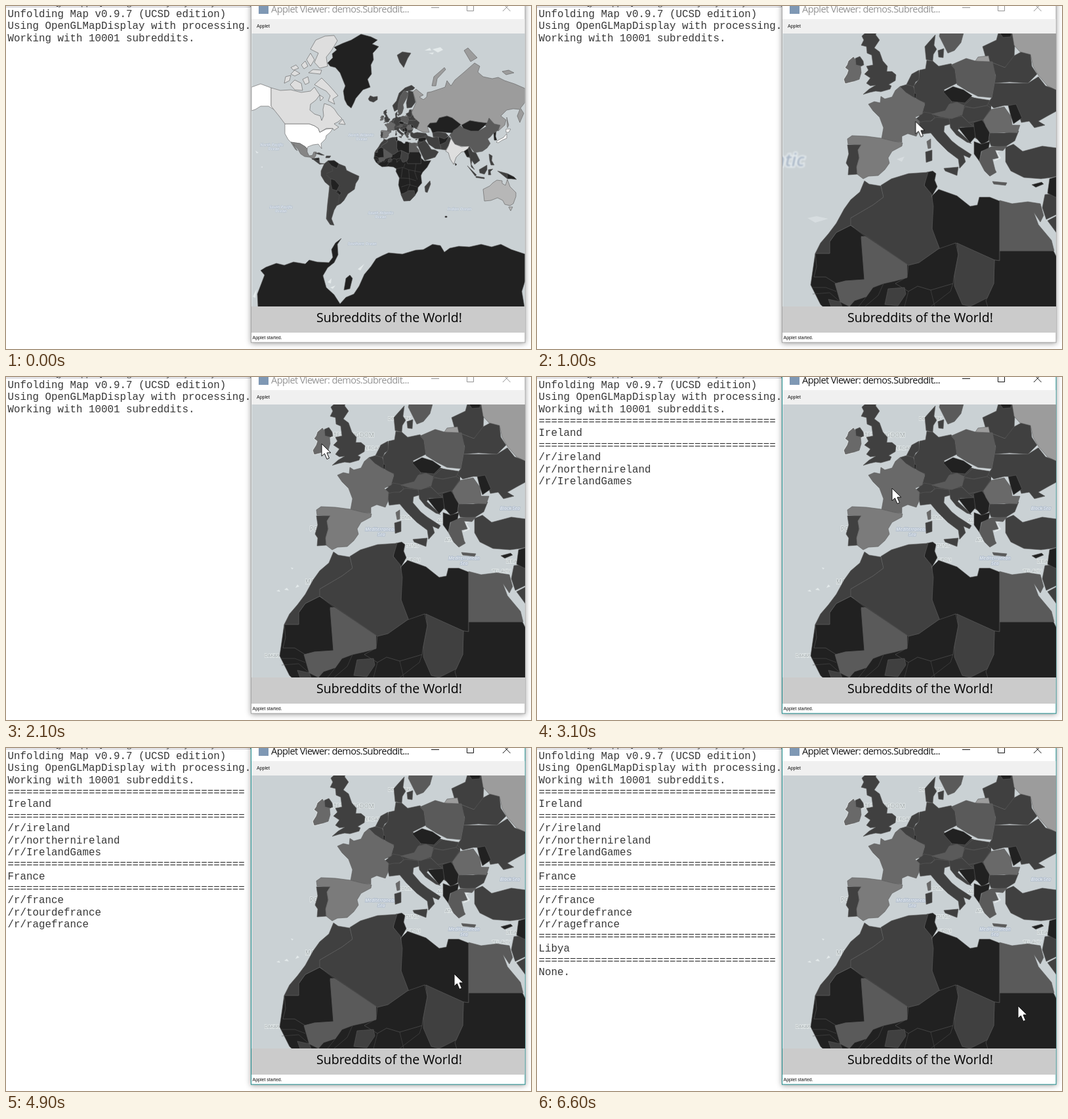
Animation, 800 px wide and 524 px high, one loop 6700 ms. Source, as an HTML page:

```html
<!DOCTYPE html>
<html lang="en">
<head>
<meta charset="utf-8">
<title>Map applet</title>
<style>
html, body { margin: 0; width: 100%; height: 100%; overflow: hidden; background: #fff }
#stage { position: absolute; left: 0; top: 0; width: 800px; height: 524px; overflow: hidden }
#stage > svg { position: absolute; inset: 0 }
pre { position: absolute; left: 2.4px; top: 4px; margin: 0; color: #383838;
  font: 15.85px/18.36px "Liberation Mono", "Liberation Serif", monospace }
text { font-family: "Open Sans", "Noto Sans", sans-serif }
.map path { stroke: #5c5c5c; stroke-width: .6; stroke-linejoin: round; vector-effect: non-scaling-stroke }
.map .line { fill: none; stroke: #555; stroke-width: .5 }
.map .coast { fill: none; stroke: #eef2f2; stroke-width: 2 }
.map .ice { fill: #e4eaeb; stroke: none }
.map .fill { stroke: none }
.sea text { font-style: italic; font-weight: 600; font-size: 6px; fill: #e9eef3; stroke: #aebbcb;
  stroke-width: .9px; paint-order: stroke; text-anchor: middle }
.sea.big text { font-size: 7px; stroke-width: 1.6px }
.place text { font-size: 7px; fill: #98a0a3; stroke: #e9eeee; stroke-width: 1.5px; paint-order: stroke }
.place .country { font-size: 9px }
.sea #ntic { font-size: 27px; fill: #a9b6c6; stroke: #e6ecef; stroke-width: 4px; text-anchor: start; filter: blur(1px) }
.tiny { font: 7px "Liberation Sans", sans-serif; fill: #111 }

/* one 6.7 s loop for everything */
.anim { animation: 6.7s infinite step-end }
#world { animation-name: until-zoom }
#europe { animation-name: from-zoom }
#coarse { animation-name: until-tiles }
#fine { animation-name: from-tiles }
#ireland { animation-name: first }
#france { animation-name: second }
#libya { animation-name: third }
#frame { animation-name: edge }
#title { animation-name: ink }
#pointer { animation: 6.7s infinite linear move }
#arrow { animation-name: enter }
@keyframes until-zoom { 0% { visibility: visible } 14.92%, 100% { visibility: hidden } }
@keyframes from-zoom { 0% { visibility: hidden } 14.92%, 100% { visibility: visible } }
@keyframes until-tiles { 0% { opacity: 1 } 22.38%, 100% { opacity: 0 } }
@keyframes from-tiles { 0% { opacity: 0 } 22.38%, 100% { opacity: 1 } }
@keyframes first { 0% { visibility: hidden } 34.32%, 100% { visibility: visible } }
@keyframes second { 0% { visibility: hidden } 53.73%, 100% { visibility: visible } }
@keyframes third { 0% { visibility: hidden } 82.08%, 100% { visibility: visible } }
@keyframes edge { 0% { stroke: #a3a3a3 } 34.32%, 100% { stroke: #17898a } }
@keyframes ink { 0% { color: #949494 } 34.32%, 100% { color: #151515 } }
@keyframes enter { 0% { visibility: hidden } 4.47%, 100% { visibility: visible } }
@keyframes move {
  0%, 4.47% { transform: translate(690px, 400px); animation-timing-function: ease-out }
  11.94%, 13.43% { transform: translate(588px, 184px) }
  16.41%, 20.9% { transform: translate(566px, 169px); animation-timing-function: ease-in-out }
  29.85%, 35.82% { transform: translate(481px, 102px); animation-timing-function: ease-in-out }
  44.78%, 53.73% { transform: translate(541px, 170px); animation-timing-function: ease-in-out }
  62.69% { transform: translate(661px, 322px); animation-timing-function: ease-out }
  66.4%, 94.03% { transform: translate(683px, 345px) }
  98.5%, 100% { transform: translate(733px, 394px) }
}
</style>
</head>
<body>
<div id="stage">
<pre>Unfolding Map v0.9.7 (UCSD edition)
Using OpenGLMapDisplay with processing.
Working with 10001 subreddits.
<span id="ireland" class="anim">======================================
Ireland
======================================
/r/ireland
/r/northernireland
/r/IrelandGames
</span><span id="france" class="anim">======================================
France
======================================
/r/france
/r/tourdefrance
/r/ragefrance
</span><span id="libya" class="anim">======================================
Libya
======================================
None.</span></pre>

<svg width="800" height="524" viewBox="0 0 800 524">
  <path d="M0 1.5H373" stroke="#bcbcc6"/>
  <text x="76" y="-1" font-size="12" fill="#333">[Java Applet] C:\Program Files\Java\jre\bin\javaw.exe (</text>

  <!-- window -->
  <rect id="frame" class="anim" x="373.5" y="-20.5" width="417.5" height="534.5" fill="#fff"
    style="filter: drop-shadow(0 1px 4px #0006)"/>
  <rect x="385" y="-4" width="15" height="16" fill="#7f98b4"/>
  <g id="title" class="anim" fill="none" stroke="currentColor">
    <text x="404" y="9.5" font-size="14.6" letter-spacing="-.6" fill="currentColor" stroke="none">Applet Viewer: demos.Subreddit...</text>
    <path d="M648 2.5H660M702.5 -3V7.5H712.5V-3M757 -4L768.5 8M768.5 -4L757 8"/>
  </g>
  <rect x="374" y="20" width="416.5" height="22" fill="#f0f0f0"/>
  <text class="tiny" x="382" y="33">Applet</text>
  <rect x="374" y="459" width="416.5" height="40" fill="#cbcbcb"/>
  <text x="584" y="483" font-size="19.6" text-anchor="middle">Subreddits of the World!</text>
  <text class="tiny" x="375.5" y="508.5">Applet started.</text>

  <svg class="map" x="374.5" y="42" width="416" height="417" viewBox="374.5 42 416 417">
    <rect x="374" y="42" width="417" height="417" fill="#cad1d4"/>

    <g id="europe" class="anim">
      <g id="coarse" class="anim sea">
        <text id="ntic" x="362" y="245">ntic</text>
        <path class="ice" d="M412 324l14-3 18 4-20 6zM548 234l12-4-4 8z" opacity=".5"/>
      </g>
      <g id="fine" class="anim">
        <g class="place">
          <text class="country" x="483" y="91.5">UNITED KINGDOM</text>
          <text x="530" y="111">AMSTERDAM</text>
          <text x="582" y="66">DENMARK</text>
          <text class="country" x="463" y="235">PORTUGAL</text>
          <text x="598" y="217">ROME</text>
          <text x="609" y="260">TUNIS</text>
          <text x="606" y="282">TRIPOLI</text>
          <text class="country" x="456" y="316">MOROCCO</text>
          <text x="394" y="428">DAKAR</text>
          <text x="669" y="251">ATHENS</text>
          <text x="657" y="222">ALBANIA</text>
          <text x="741" y="299">TEL AVIV</text>
          <text x="762" y="284">LEBANON</text>
        </g>
        <g class="sea big">
          <text x="571" y="235">Mediterranean</text><text x="572" y="243">Sea</text>
          <text x="698" y="279">Mediterranean</text><text x="698" y="287">Sea</text>
          <text x="768" y="203">Black Sea</text>
        </g>
        <path class="ice" d="M412 327l4-2 2 3zM424 325l4-3 3 4zM441 322l3-5 3 3zM434 291l4 1-2 2z"/>
      </g>
      <path class="coast" d="M482 78L475 84 473 90 470 94 475 98 473 104 468 112 470 118 482 115"/>
      <path class="coast" d="M712 217L700 223 706 232 697 236" opacity=".6"/>

      <g id="mid">
        <!-- Africa, dark base reaching south of the view -->
        <g fill="#212121">
          <path d="M424 378L417 426 432 456 456 478 483 496 535 492 576 497 600 512 596 533 624 587 617 643 637 716 661 775 712 772 752 728 773 694 776 664 807 629 800 567 813 540 850 500 881 444 827 448 800 422 786 388 784 374 705 374 600 300 478 340 446 360 446 378Z"/>
          <path d="M424 378H446V360L456 346 478 335 500 352 494 354 499 418 470 420 456 424 440 414 422 414 426 398Z"/>
          <path d="M594 254L603 252 608 256 606 266 610 276 602 290 590 274Z"/>
          <path d="M602 290L612 280 640 290 660 306 671 304 674 292 690 292 705 298 705 389 697 388 638 362 614 372 602 342Z"/>
          <path d="M566 396L582 392 612 371 638 362 642 380 635 416 634 424 600 434 580 428 566 436 546 424 564 414Z"/>
          <path d="M705 374H787L800 400V470H690L684 450 696 424 697 388 705 389Z"/>
        </g>
        <g fill="#404040">
          <path d="M499 267L506 272 524 275 528 292 512 304 478 324V335L456 346 446 360V378H424L432 362 444 348 456 332 468 310 478 296 492 284Z"/>
          <path d="M524 274L540 264 566 256 596 254 590 274 601 287 604 306 602 340 613 370 582 392 566 396 478 335V324L512 304 528 292Z"/>
          <path d="M640 362L697 388 696 424 686 446 660 459 648 456 636 428 636 412 642 380Z"/>
          <path d="M636 720L665 710 700 690 745 690 752 728 712 772 661 775Z"/>
          <path d="M444 448L462 452 466 462 452 470ZM535 432L560 430 562 440 550 458 530 456Z"/>
        </g>
        <path fill="#5a5a5a" d="M494 352H501L564 395V415L546 420 528 424 512 430 502 444 484 450 476 459 462 452 454 424 470 420 499 418Z"/>
        <path fill="#5a5a5a" d="M705 297L724 302 748 299 767 302 772 320 767 330 757 315 764 334 784 358 788 374H705Z"/>
        <path class="line" d="M420 430H440L456 436M420 440L446 438 462 452M490 459L502 444M528 424L520 442 500 459M566 436L560 459M634 424L630 436 600 459M600 434L606 459M540 459L520 490M600 512L650 500 700 520 800 540M624 587L700 590 760 610M640 660L700 640 770 660M650 500L640 580M700 520L710 640 690 690M760 470L750 540 770 600M670 470L660 500"/>

        <!-- Europe -->
        <g fill="#404040">
          <path class="fill" d="M578 166L632 146 660 138 692 148V190L682 210 668 202 644 178 600 174Z"/>
          <path d="M508 34L495 46 498 52 494 60 502 62 503 72 510 75 512 90 502 92 505 98 499 104 508 110 502 118 508 122 516 121 506 127 497 135 507 132 516 130 524 131 538 127 540 122 536 120 546 114 547 105 541 100 533 100 534 92 527 84 522 70 514 64 522 52 516 44 522 30Z"/>
          <path d="M485 80L492 77 497 84 498 90 494 92 486 90Z"/>
          <path d="M473 212L494 212 489 220 491 232 487 246 488 257 474 258 475 246 471 240 475 226Z"/>
          <path d="M553 123L563 120 573 122 577 132 576 141 562 133Z"/>
          <path d="M563 120L571 104 582 98 583 112 577 116 574 123Z"/>
          <path d="M583 98L592 96 594 83 603 84 612 92 631 88 637 96 640 118 620 128 632 146 623 160 604 165 587 163 591 150 577 141 574 122 582 112Z"/>
          <path d="M593 82L591 62 598 54 607 44 605 60 609 66 604 74 603 84ZM611 68L620 65 619 79 612 78Z"/>
          <path d="M683 76L679 62 700 52 706 30 722 28 728 60 727 80 713 94 690 85Z"/>
          <path d="M690 85L713 94 727 76 738 70 752 74 754 92 762 104 748 118 720 116 697 118 699 106Z"/>
          <path d="M697 118L748 118 764 108 775 122 800 130V156L778 168 764 176 774 182 758 186 750 176 738 178 730 152 712 152 696 156 687 148 693 140Z"/>
          <path d="M578 172L590 162 601 164 606 170 600 176 592 178 582 178Z"/>
          <path d="M650 152L664 140 690 144 686 152 664 156Z"/>
          <path d="M646 166L652 154 666 156 686 152 692 156 680 174 658 178Z"/>
          <path d="M580 178L592 176 600 176 608 170 628 172 631 180 621 183 620 192 632 206 642 214 662 227 659 232 650 228 653 238 644 248 642 234 626 222 610 206 600 194 584 196Z"/>
          <path d="M620 248L642 246 640 259 622 252ZM592 223L602 220 602 236 593 239Z"/>
          <path d="M628 172L647 168 660 180 668 186 645 185 641 190 662 210 655 208 639 197 630 186Z"/>
          <path d="M690 194L712 194 734 191 728 206 712 216 692 214 688 204Z"/>
          <path d="M714 216L726 211 740 222 770 214 800 218 840 222 860 250 830 254 800 258 784 262 768 264 742 262 722 252 714 238Z"/>
          <path d="M774 288L800 286 830 300 776 326 770 308Z"/>
          <path d="M778 328L830 300 850 330 800 358Z"/>
        </g>
        <g fill="#212121">
          <path d="M619 131L634 123 650 128 663 137 652 148 632 146Z"/>
          <path d="M575 133L578 134 577 141 575 139Z"/>
          <path d="M718 152L730 150 739 171 726 180 722 168Z"/>
          <path d="M642 186L668 184V200L660 209Z"/>
          <path d="M665 178L678 174 690 190 688 206 678 212 668 200Z"/>
          <path d="M666 207L677 211 690 207 688 218 677 222 674 237 666 226Z"/>
          <path d="M754 273L769 269 772 272 760 277ZM778 286L781 264 800 258 850 254 830 290 790 292Z"/>
          <path d="M706 42L724 36 722 47 710 48Z"/>
        </g>
        <g fill="#696969">
          <path d="M505 150L514 146 523 148 524 138 530 142 541 139 546 129 553 123 562 132 576 141 591 148 587 165 576 170 583 176 582 190 578 199 565 195 556 199V208L545 207 525 203 528 186 522 170 512 160Z"/>
          <path d="M482 78L475 84 473 90 470 94 475 98 473 104 468 112 470 118 482 115 491 112 494 102 493 92 486 90 485 82Z"/>
          <path d="M680 174L692 158 712 154 722 168 724 182 736 182 732 194 712 193 690 194 684 184Z"/>
          <path d="M594 207L600 203V217L596 218Z"/>
        </g>
        <path fill="#7b7b7b" d="M473 203L480 198 502 199 525 202 545 207 557 209 556 214 541 222 535 232 537 240 530 250 520 259 505 260 497 264 488 257 487 246 491 232 489 220 494 212 474 211Z"/>
        <g fill="#5a5a5a">
          <path d="M631 90L654 80 668 84 694 85 699 108 693 140 672 138 656 130 640 120 637 97Z"/>
          <path d="M602 165L622 160 628 150 640 147 651 152 648 166 632 172 614 169Z"/>
          <path d="M616 34L613 46 626 72 636 68 646 56 652 34Z"/>
          <path d="M674 237L678 222 692 215 716 214 710 221 698 220 703 232 694 234 698 250 700 254 690 260 682 252ZM694 268L716 270 714 274 696 272Z"/>
        </g>
        <path fill="#9c9c9c" d="M722 30L727 60 736 70 752 74 756 92 764 106 778 122 805 135V30ZM668 84L672 78 688 76 690 85Z"/>
      </g>
    </g>

    <g id="world" class="anim">
      <g class="sea">
        <text x="405" y="214">North Pacific</text><text x="408" y="220">Ocean</text>
        <text x="419" y="309">South Pacific</text><text x="419" y="315">Ocean</text>
        <text x="541" y="199">North Atlantic</text><text x="542" y="205">Ocean</text>
        <text x="571" y="318">South Atlantic</text><text x="571" y="324">Ocean</text>
        <text x="691" y="312">Indian Ocean</text><text x="543" y="365">Southern Ocean</text>
      </g>
      <path class="ice" d="M638 68l8-4 2 4zM650 66l12-3 4 4-8 4zM644 72l8-1-2 3zM380 221l5 3-3 1zM388 246l3-1v2z"/>
      <use href="#mid" transform="matrix(.187 0 0 .187 482.7 153)"/>

      <!-- Americas -->
      <g fill="#fff">
        <path d="M374 124L388 119 404 125V153L413 161 400 153 388 153 380 158 374 160Z"/>
        <path d="M425 180H462L470 183 476 187 478 193 488 188 498 187 494 193 488 198 487 203 480 210 481 218 476 211 468 212 460 215 459 218 456 215 448 210 434 208 430 204 425 195Z"/>
      </g>
      <g fill="#dedede">
        <path d="M404 125L418 129 434 128 450 132 464 130 470 124 474 130 478 136 472 144 464 150 463 159 470 165 479 168 481 175 484 168 483 158 485 149 494 152 500 157 506 166 512 172 506 177 500 180 507 185 500 190 498 187 488 187 478 193 476 187 470 183 462 180H425L416 168 404 153Z"/>
        <path d="M470 120L481 110 492 121 500 130 506 137 498 142 501 150 491 145 494 137 488 130 480 126Z"/>
        <path d="M464 66L472 52 486 46 500 45 505 53 496 68 488 78 490 92 478 95 470 86 476 72Z"/>
        <path d="M433 120L440 113 450 118 452 129 440 128ZM424 118L426 108 434 106 432 114ZM461 102L468 97 481 98 479 104ZM434 104L440 98 448 103 440 107ZM458 82L464 72 470 82 464 92ZM452 112L460 108 462 117 456 120ZM434 94l8-4 4 5-8 3zM450 90l6-6 4 8-6 4zM478 136l6 4-5 5zM507 180l6-7 4 8z"/>
      </g>
      <g fill="#212121">
        <path d="M490 87L498 79 497 73 504 67 500 63 513 57 526 52 541 43 556 47 566 52 558 58 568 62 559 72 560 82 556 90 557 104 551 112 555 124 544 128 533 141 530 148 526 156 520 151 516 143 514 130 517 122 513 112 509 102 502 94 494 92Z"/>
        <path d="M384 460L383 440 394 411 388 404 396 399 412 393 424 396 438 391 456 394 462 388 474 391 492 392 498 384 496 372 502 362 511 355 505 364 506 380 500 392 490 400 483 412 488 430 500 441 509 455 518 445 530 440 538 428 546 410 556 398 564 386 574 381 583 377 604 379 624 373 636 372 650 364 662 366 668 376 676 370 690 367 706 368 724 364 740 368 754 364 770 372 791 379V420L786 436 790 460Z"/>
        <path d="M518 416L524 411 528 416 524 432 515 434Z"/>
      </g>
      <path fill="#858585" d="M434 208L448 210 456 215 459 218 459 223 462 229 467 228 469 223 473 223 472 229 468 234 463 231 455 230 449 226 445 219 438 211 444 221 441 219Z"/>
      <g fill="#404040">
        <path d="M485 241L491 236 500 236 507 241 517 245 519 251 527 255 538 260 537 265 533 271 531 280 521 287 515 297 510 302 504 305 500 312 496 325 500 335 494 334 488 325 490 302 493 275 486 269 480 259 480 252Z"/>
        <path d="M466 233L477 232 478 240 485 241 478 242ZM471 225l6-1 8 4-4 0ZM488 229h7l-2 3h-6Z"/>
      </g>
      <path fill="#212121" d="M490 237L500 236 507 241 504 248 496 244ZM495 264L501 266 508 274 504 282 497 280 495 272ZM466 234l11-2 0 4zM505 281l6 4-2 4-6-4Z"/>
      <path class="line" d="M496 244L498 252 488 256M495 264L488 258M493 275L492 302 490 326 496 333M504 282L508 290 506 302"/>

      <!-- northern Europe and Asia -->
      <g fill="#404040">
        <path d="M552 142L555 137 560 139 566 138 566 143 560 147 554 145ZM596 75L604 70 617 72 612 80 606 94 600 86Z"/>
        <path d="M592 161L589 152 595 145 599 133 608 125 618 121 623 125 620 128 612 130 606 130 601 138 598 148 597 158Z"/>
        <path d="M612 139L610 148 611 156 618 155 624 147 620 131 613 129Z"/>
        <path d="M627 212L638 205 643 211 648 219 654 220 659 223 654 231 638 236 633 226Z"/>
        <path d="M638 198L644 199 650 201 658 199 661 208 663 219 654 218 644 211Z"/>
        <path d="M650 194L658 192 670 194 674 198 668 204 658 200 651 200Z"/>
        <path d="M661 208L668 206 676 200 679 204 674 214 670 220 663 219Z"/>
        <path d="M706 214L711 223 716 224 722 236 714 242 710 236 709 242 714 250 709 246 707 232 702 230 698 222Z"/>
        <path d="M703 244L717 258 715 260ZM721 250L733 243 733 250 729 257 722 255ZM716 260l13 2v2l-13-2ZM735 250l7-1-4 4 1 5-4 0ZM736 226l5 3-1 7 4 7-5 0-2-7ZM749 252L764 256V264Z"/>
        <path d="M638 276L646 267 647 272 642 285 639 284Z"/>
      </g>
      <path fill="#5a5a5a" d="M599 167L597 158 598 148 601 138 607 129 613 133 611 140 605 151 606 156 603 164Z"/>
      <path fill="#5a5a5a" d="M676 197L682 190 691 181 697 187 708 191 720 191 732 184 728 180 736 171 744 180 753 182 750 190 743 194 738 200 734 203 738 210 733 217 726 222 714 224 706 214 694 214 684 211Z"/>
      <g fill="#dedede">
        <path d="M678 202L684 211 694 215 706 214 702 222 694 223 686 231 682 242 677 234 674 224 670 222 674 214Z"/>
        <path fill="#fff" d="M762 188L769 188 766 193 762 193ZM763 195L763 202 756 205 750 209 747 208 750 205 758 201Z"/>
      </g>
      <g fill="#9c9c9c">
        <path d="M618 163L621 156 625 147 620 131 625 127 636 136 630 139 636 143 641 139 642 132 648 131 660 127 669 124 672 114 678 122 684 113 697 102 714 87 722 92 719 101 727 108 741 111 750 109 760 114 775 119 791 126V147L784 156 789 164 783 178 779 168 783 158 773 157 763 159 754 168 762 174 760 182 750 191 753 182 744 180 736 171 733 179 718 177 707 175 694 182 680 171 672 168 660 171 656 178 646 179 642 184 645 193 636 193 626 188 630 178 622 171Z"/>
        <path d="M649 122L652 108 668 94 670 97 657 111 655 122ZM698 68L704 64 718 79 708 85ZM756 100l10-2 8 4-12 3zM763 170L766 182 764 186Z"/>
      </g>
      <g fill="#212121">
        <path d="M642 184L646 179 656 178 660 171 672 168 680 171 693 181 688 186 682 190 680 194 668 193 658 192 650 194 647 187Z"/>
        <path d="M694 182L707 175 718 177 733 179 728 184 720 191 708 191 697 187Z"/>
        <path d="M659 200L668 203 676 198 670 208 661 212ZM743 194L747 192 746 199 748 205 744 205ZM698 222L704 218 707 230 703 231Z"/>
        <path d="M764 256L774 261 778 265 770 264 764 264ZM684 240l3 2-2 2zM669 321h3v2h-3z"/>
      </g>
      <path fill="#b7b7b7" d="M727 280L737 275 742 270 748 266 756 267 756 271 761 274 764 265 768 276 777 285 777 291 773 302 768 305 760 303 757 297 749 293 739 297 729 298ZM766 307H772L769 313Z"/>
      <path class="ice" d="M490 422l6-6-1 8zM494 430l8-3-4 5zM536 402l10-8-6 10zM376 444l6-12-2 14z"/>
    </g>
  </svg>

  <g id="pointer">
    <path id="arrow" class="anim" d="M0 0V19L4.4 15 8 23.5 11.5 22 8 13.8H14Z" fill="#fff" stroke="#111"/>
  </g>
</svg>
</div>
</body>
</html>
```
